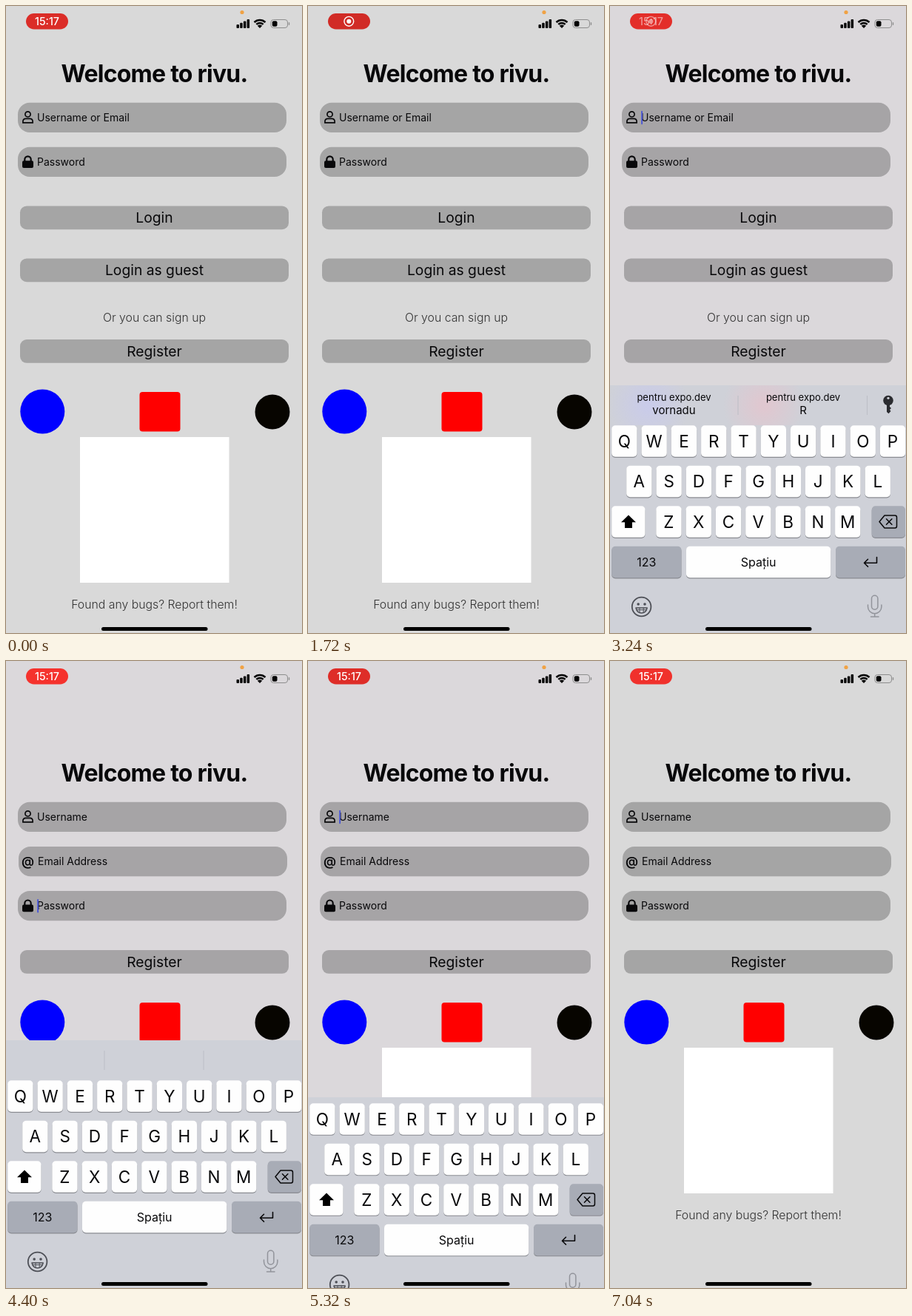
An HTML page with a canvas for the animation above (7080 ms loop, 400 by 848 pixels).

```html
<!DOCTYPE html>
<html lang="en">
<head>
<meta charset="utf-8">
<title>Sign in demo</title>
<style>
html, body { margin: 0; width: 100%; height: 100%; overflow: hidden; background: #d9d9d9; }
canvas { display: block; width: 400px; height: 848px; }
</style>
</head>
<body>
<canvas id="stage"></canvas>
<script>
const W = 400, H = 848, LOOP = 7080, SLIDE = 120;
const canvas = document.getElementById('stage');
const ratio = window.devicePixelRatio || 1;
canvas.width = W * ratio;
canvas.height = H * ratio;
const c = canvas.getContext('2d');
const FONT = 'Inter, "Liberation Sans", sans-serif';
const INK = '#08080a';

// Steps of the session: start time, screen, focused field, suggestion bar, slide
const STEPS = [
  { at: 0, screen: 'login' },
  { at: 280, screen: 'login', focus: 'user', bar: 'saved' },
  { at: 1080, screen: 'login' },
  { at: 1880, screen: 'login', focus: 'user', bar: 'saved' },
  { at: 3480, screen: 'join', focus: 'user', bar: 'words' },
  { at: 4000, screen: 'join', focus: 'pass', bar: 'words' },
  { at: 4623, screen: 'join', bar: 'words', slide: 'out' },
  { at: 4743, screen: 'join' },
  { at: 5258, screen: 'join', focus: 'user', slide: 'in' },
  { at: 5378, screen: 'join', focus: 'user', bar: 'words' },
  { at: 5680, screen: 'join', focus: 'email', bar: 'saved' },
  { at: 6240, screen: 'join' }
];

const clamp = x => Math.max(0, Math.min(1, x));
const easeOut = x => 1 - (1 - clamp(x)) ** 3;

function box(x, y, w, h, r, fill) {
  c.fillStyle = fill;
  c.beginPath();
  c.roundRect(x, y, w, h, r);
  c.fill();
}

function disc(x, y, r, fill) {
  c.fillStyle = fill;
  c.beginPath();
  c.arc(x, y, r, 0, Math.PI * 2);
  c.fill();
}

function ring(x, y, r, width, color) {
  c.strokeStyle = color;
  c.lineWidth = width;
  c.beginPath();
  c.arc(x, y, r, 0, Math.PI * 2);
  c.stroke();
}

function path(d, color, width) {
  const p = new Path2D(d);
  if (width) {
    c.strokeStyle = color;
    c.lineWidth = width;
    c.stroke(p);
  } else {
    c.fillStyle = color;
    c.fill(p);
  }
}

function text(s, x, y, size, { align = 'center', weight = 400, color = INK, gap = 0 } = {}) {
  c.font = `${weight} ${size}px ${FONT}`;
  c.letterSpacing = gap + 'px';
  c.textAlign = align;
  c.fillStyle = color;
  c.fillText(s, x, y);
  c.letterSpacing = '0px';
}

function statusBar(t) {
  const wave = Math.cos((t - 4680) / 2000 * Math.PI * 2);
  const red = Math.round(231 + 22 * wave), low = Math.round(47 + 4 * wave);
  box(27, 10, 57, 21.5, 10.75, `rgb(${red},${low},${low - 5})`);

  // The clock and the recording sign take turns
  const rec = clamp((t - 800) / 200) * (1 - clamp((t - 3140) / 200));
  c.globalAlpha = 1 - rec;
  text('15:17', 55.5, 26, 14.3, { weight: 500, color: '#fff' });
  c.globalAlpha = rec;
  ring(55.3, 20.8, 6.4, 1.4, '#fff');
  disc(55.3, 20.8, 3, '#fff');
  c.globalAlpha = 1;

  disc(319, 8.5, 2.6, '#f0a244');
  for (let i = 0; i < 4; i++) {
    const h = 5 + i * 2.3;
    box(311.5 + i * 4.7, 30 - h, 3.5, h, 1, '#050505');
  }
  c.lineCap = 'butt';
  [10.6, 6.6].forEach(r => {
    c.strokeStyle = '#050505';
    c.lineWidth = 2.5;
    c.beginPath();
    c.arc(343, 29.5, r, -Math.PI * 0.75, -Math.PI * 0.25);
    c.stroke();
  });
  path('M343 30 L339.8 26.7 Q343 24.1 346.2 26.7 Z', '#050505');
  c.strokeStyle = '#8d8d8d';
  c.lineWidth = 1;
  c.beginPath();
  c.roundRect(358, 18.5, 22.5, 11, 3.5);
  c.stroke();
  box(359.8, 20.2, 6.7, 7.6, 2, '#050505');
  box(381.8, 22, 1.4, 4, 1, '#8d8d8d');
}

const icons = {
  user(y) {
    ring(29.5, y - 4.3, 3.6, 1.7, INK);
    path(`M22.9 ${y + 7.2} v-1.6 q0-4 4-4 h5.2 q4 0 4 4 v1.6 z`, INK, 1.7);
  },
  pass(y) {
    box(22, y - 1.5, 15, 9.8, 2, INK);
    path(`M25.3 ${y} v-3.2 a4.2 4.2 0 0 1 8.4 0 v3.2`, INK, 2.2);
  },
  email(y) {
    text('@', 29.5, y + 5.5, 17, { weight: 600 });
  }
};

function field(kind, label, y, fill, focus) {
  const x = kind === 'email' ? 17 : 16;
  box(x, y, 363, 40.3, 16, fill);
  icons[kind](y + 20);
  text(label, x + 26, y + 25.3, 14, { align: 'left' });
  if (focus === kind) box(x + 26.2, y + 11, 1.8, 18.5, 1, '#4653d6');
}

function button(label, y, fill) {
  box(19, y, 363, 31.8, 9, fill);
  text(label, 200.5, y + 23, 19.3);
}

function footer(y) {
  disc(49.3, y + 29.5, 30, '#0000ff');
  box(180.5, y + 3, 55, 53.5, 4, '#ff0000');
  disc(360, y + 30, 23.5, '#070500');
  box(100, y + 64, 201.5, 197, 0, '#fff');
  text('Found any bugs? Report them!', 200.5, y + 296, 15.8, { weight: 300, color: '#333' });
}

function title(y) {
  text('Welcome to rivu.', 200.5, y, 32, { weight: 700, gap: -0.75 });
}

function loginScreen(s, fill) {
  title(103);
  field('user', 'Username or Email', 130.7, fill, s.focus);
  field('pass', 'Password', 190.7, fill, s.focus);
  button('Login', 270.4, fill);
  button('Login as guest', 341.4, fill);
  text('Or you can sign up', 200.5, 427, 15.8, { weight: 300, color: '#333' });
  button('Register', 451, fill);
  footer(519);
}

function joinScreen(s, fill, t) {
  title(163);
  field('user', 'Username', 190.7, fill, s.focus);
  field('email', 'Email Address', 251, fill, s.focus);
  field('pass', 'Password', 310.9, fill, s.focus);
  c.globalAlpha = t > 4580 && t < 4710 ? 0.2 + 0.8 * clamp((t - 4620) / 90) : 1;
  button('Register', 391, fill);
  c.globalAlpha = 1;
  footer(459);
}

function key(x, y, w, label, size = 22.5, fill = '#fefefe') {
  box(x, y + 1.2, w, 42.4, 5, '#898b91');
  box(x, y, w, 42.4, 5, fill);
  if (label) text(label, x + w / 2, y + 21.2 + size * 0.364, size);
}

function letters(row, x, y) {
  [...row].forEach((ch, i) => key(x + i * 40.3, y, 34.3, ch));
}

function glow(x, color) {
  const g = c.createRadialGradient(x, 540, 5, x, 540, 55);
  g.addColorStop(0, `rgba(${color},0.5)`);
  g.addColorStop(1, `rgba(${color},0)`);
  c.fillStyle = g;
  c.fillRect(x - 55, 513, 110, 54);
}

function suggestions(s) {
  const divider = x => box(x - 0.5, 527, 1, 26, 0, '#bcbec6');
  if (s.bar === 'words') {
    [133, 267].forEach(divider);
    return;
  }
  if (s.screen === 'login') {
    glow(52, '196,198,250');
    glow(208, '240,190,200');
  }
  [173, 347.5].forEach(divider);
  [['vornadu', 86.5], ['R', 261]].forEach(([name, x]) => {
    text('pentru expo.dev', x, 534, 13);
    text(name, x, 552, 15);
  });
  disc(376, 533.5, 6.8, '#2b2c30');
  disc(376, 530.3, 1.6, '#cfd1d8');
  path('M374 538 h4 v4 l2 2 l-2 2 l1.5 2 l-3 3.2 l-2.5-2.2 z', '#2b2c30');
}

function keyboard(s, dy) {
  const dark = '#a8acb6', email = s.focus === 'email';
  const top = s.bar ? 513 : 559;
  c.save();
  c.translate(0, dy);
  box(0, top, W, H - top, 0, '#cfd1d8');
  if (s.bar) suggestions(s);

  letters('QWERTYUIOP', 2.2, 567.3);
  letters('ASDFGHJKL', 22.2, 621.8);
  letters('ZXCVBNM', 62.3, 676.3);
  key(2.2, 676.3, 45.3);
  key(353.7, 676.3, 45.3, '', 0, dark);
  key(2.2, 730.8, 94.3, '123', 16, dark);
  key(103, 730.8, email ? 94.3 : 195.3, 'Spațiu', 16);
  if (email) {
    key(204, 730.8, 44, '@', 17);
    key(254.2, 730.8, 44, '.', 16);
  }
  key(305, 730.8, 94, '', 0, dark);

  c.lineJoin = c.lineCap = 'round';
  path('M25 688.5 L35 698.3 H30 V706 H20 V698.3 H15 Z', '#000');
  path('M371 689 H385 Q387.5 689 387.5 691.5 V703.5 Q387.5 706 385 706 H371 L364 697.5 Z', INK, 1.5);
  path('M373.5 693.8 l7.4 7.4 M380.9 693.8 l-7.4 7.4', INK, 1.5);
  path('M360.5 745.5 V753.3 H343.5 M348.5 748.3 L343.5 753.3 L348.5 758.3', INK, 1.6);

  const tone = '#4d4f56';
  ring(42.6, 812.5, 12.8, 1.8, tone);
  disc(38.2, 809, 1.8, tone);
  disc(47, 809, 1.8, tone);
  path('M35 814 H50.2 Q48.5 821 42.6 821 Q36.7 821 35 814 Z', tone, 1.5);
  path('M36 816.7 H49.2 M40 814 V820 M45.2 814 V820', tone, 1);
  if (!email) {
    const mic = '#92949b';
    path('M353.5 801.5 a4.2 4.2 0 0 1 8.4 0 V812 a4.2 4.2 0 0 1 -8.4 0 Z', mic, 1.5);
    path('M348.5 810 v2.5 a9.2 9.2 0 0 0 18.4 0 V810 M357.7 821.8 V826 M352.5 826 H363', mic, 1.5);
  }
  c.restore();
}

function draw(t) {
  c.setTransform(ratio, 0, 0, ratio, 0, 0);
  const s = STEPS.findLast(step => step.at <= t);
  const warm = t >= 1880 && t < 6240;
  const fill = warm ? '#a6a4a6' : '#a5a5a5';
  box(0, 0, W, H, 0, warm ? '#dbd8db' : '#d9d9d9');
  c.lineJoin = 'miter';
  c.lineCap = 'butt';
  statusBar(t);
  if (s.screen === 'login') loginScreen(s, fill);
  else joinScreen(s, fill, t);

  const move = easeOut((t - s.at) / SLIDE);
  if (s.slide === 'out') keyboard(s, 335 * move);
  else if (s.focus) keyboard(s, s.slide === 'in' ? 289 * (1 - move) : 0);
  box(129, 840, 143.5, 5, 2.5, '#000');
}

const start = performance.now();
function tick(now) {
  draw(Math.max(0, now - start) % LOOP);
  requestAnimationFrame(tick);
}
draw(0);
requestAnimationFrame(tick);
</script>
</body>
</html>
```
